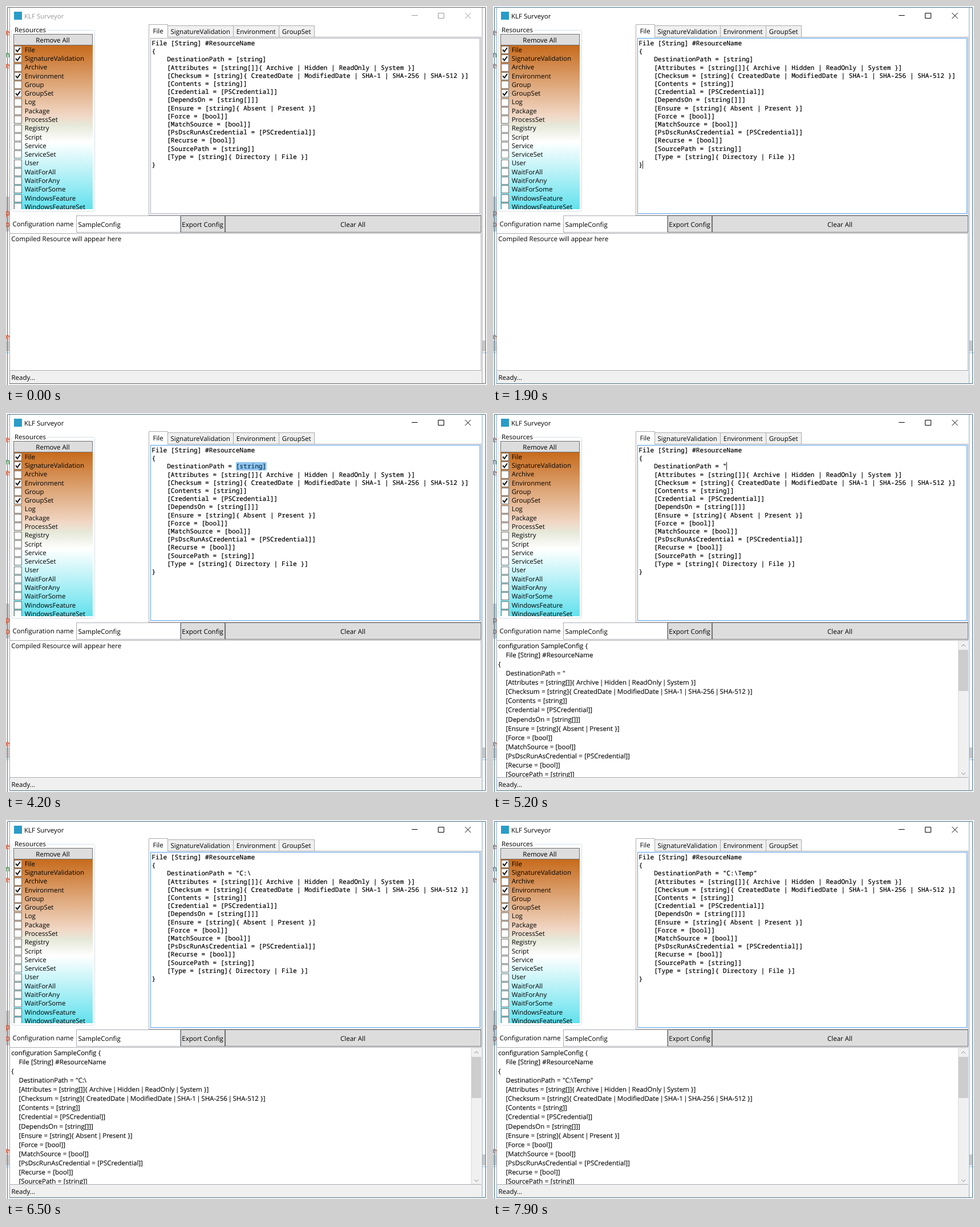
An HTML page that plays this animation: 843 px wide and 664 px high, repeating every 8000 ms.

```html
<!DOCTYPE html>
<html lang="en">
<head>
<meta charset="utf-8">
<title>KLF Surveyor</title>
<style>
html, body { margin: 0; width: 100%; height: 100%; overflow: hidden; background: #fff; }
svg { display: block; }
text { font: 11.5px "Open Sans", "Noto Sans", sans-serif; fill: #000; text-rendering: geometricPrecision; white-space: pre; }
.mid { text-anchor: middle; }
.code text { font: 11.16px "Noto Sans Mono", "DejaVu Sans Mono", monospace; stroke: #000; stroke-width: .2px; }
#out text { word-spacing: .35px; stroke: #000; stroke-width: .1px; }
.bar { letter-spacing: -1.7px; }
.behind text { font: 14px "Noto Sans Mono", monospace; fill: #d2421c; }
.btn { fill: #ddd; stroke: #707070; }
.box { fill: #fff; stroke: #abadb3; }
.tab { fill: #f0f0f0; stroke: #acacac; }
.glyph { fill: none; stroke: #000; }
.frame { fill: none; stroke: #4c7488; }
.edge { fill: none; stroke: #8fb0c4; }
.idle .glyph { stroke: #999; }
.idle .frame { stroke: #666; }
.idle .edge { stroke: #a8a8a8; }
.idle #title { fill: #999; }
.focus #editor { stroke: #569de5; }
</style>
</head>
<body>
<svg id="stage" class="idle" width="843" height="664" viewBox="0 0 843 664">
  <defs>
    <linearGradient id="sky" x2="0" y2="1">
      <stop offset="0" stop-color="#c76b1c"/>
      <stop offset=".43" stop-color="#f1d8c6"/>
      <stop offset=".49" stop-color="#e6e9da"/>
      <stop offset=".59" stop-color="#fff"/>
      <stop offset="1" stop-color="#62e1ed"/>
    </linearGradient>
    <clipPath id="listClip"><rect x="13" y="69" width="139" height="287"/></clipPath>
    <clipPath id="outClip"><rect x="7" y="399" width="809" height="239"/></clipPath>
  </defs>

  <g class="behind">
    <rect width="843" height="664" fill="#f7f7f7"/>
    <path fill="#c9c9c9" d="M0 334h7v61h-7zM0 586h7v19h-7zM834 586h7v19h-7z"/>
    <path stroke="#9cc3e0" d="M0 607.5h843"/>
    <text x="-1.5" y="51">e</text>
    <text x="-1.5" y="90" style="fill:#2c7a3a">n</text>
    <text x="-1.5" y="109">e</text>
    <text x="-1.5" y="367">p</text>
    <text x="-1.5" y="387">o</text>
    <text x="-1.5" y="584">e</text>
  </g>

  <rect x="7" y="3" width="827" height="658" fill="#fff"/>
  <path class="edge" d="M6.5 3V661M834.5 3V661"/>
  <path class="frame" d="M2.5 664V2.5H840.5V661.5H6"/>

  <rect x="14" y="10" width="14" height="14" fill="#2a9cc8"/>
  <text id="title" x="32" y="21.5">KLF Surveyor</text>
  <path class="glyph" d="M711 16.5h10.5M757.5 12.5h10v9h-10zM804.5 12l10 10M814.5 12l-10 10"/>

  <rect x="9.5" y="42.5" width="146" height="317" rx="3" fill="none" stroke="#d5dfe5"/>
  <rect x="14" y="38" width="58" height="8" fill="#fff"/>
  <text x="15" y="45.7">Resources</text>
  <rect x="13" y="69" width="139" height="287" fill="url(#sky)"/>
  <g id="list" clip-path="url(#listClip)"></g>
  <rect class="btn" x="13.5" y="49.5" width="138" height="19"/>
  <text class="mid" x="82" y="63.7">Remove All</text>

  <rect class="box" x="250.5" y="54.5" width="582" height="312"/>
  <g id="tabs"></g>
  <path d="M250.5 55V32.5H283.5V55" fill="#fff" stroke="#acacac"/>
  <text x="257.5" y="47.7">File</text>
  <rect id="editor" class="box" x="253.5" y="56.5" width="577" height="307"/>
  <g id="code" class="code"></g>
  <rect id="mark" x="403" y="86" width="53.6" height="14.6" fill="#0078d7" fill-opacity=".42"/>
  <rect id="caret" width="1" height="14.3" fill="#222"/>

  <text x="11.5" y="385.5">Configuration name</text>
  <rect class="box" x="123.5" y="367.5" width="182" height="29"/>
  <text x="126.5" y="387">SampleConfig</text>
  <rect class="btn" x="306.5" y="367.5" width="77" height="29"/>
  <text class="mid" x="344.5" y="387">Export Config</text>
  <rect class="btn" x="384.5" y="367.5" width="448" height="29"/>
  <text class="mid" x="608" y="387">Clear All</text>

  <rect class="box" x="6.5" y="398.5" width="826" height="240"/>
  <text id="hint" x="9.3" y="411.5">Compiled Resource will appear here</text>
  <g id="result">
    <g id="out" clip-path="url(#outClip)"></g>
    <path fill="#f0f0f0" d="M816 399h17v239h-17z"/>
    <path fill="#cdcdcd" d="M816 415h17v72h-17z"/>
    <path stroke="#858585" stroke-opacity=".3" d="M815.5 399v239"/>
    <path fill="none" stroke="#858585" d="M821 409l3.5-3.5 3.5 3.5M821 630l3.5 3.5 3.5-3.5"/>
  </g>

  <rect x="7" y="639" width="827" height="22" fill="#f0f0f0"/>
  <text x="9.5" y="655.3">Ready...</text>
</svg>
<script>
const $ = id => document.getElementById(id);
const add = (parent, tag, attrs, label = '') => {
  const el = document.createElementNS('http://www.w3.org/2000/svg', tag);
  for (const k in attrs) el.setAttribute(k, attrs[k]);
  el.textContent = label;
  return parent.appendChild(el);
};

const names = ('File SignatureValidation Archive Environment Group GroupSet Log Package ProcessSet Registry ' +
  'Script Service ServiceSet User WaitForAll WaitForAny WaitForSome WindowsFeature WindowsFeatureSet').split(' ');
const checked = [0, 1, 3, 5];
names.forEach((name, i) => {
  const y = 70 + i * 15.28;
  add($('list'), 'rect', { x: 14.5, y: Math.round(y) + .5, width: 13, height: 13, fill: '#fff', stroke: '#707070' });
  if (checked.includes(i))
    add($('list'), 'path', { d: `M17 ${y + 6.5}l3 3.5 5-7`, fill: 'none', stroke: '#111', 'stroke-width': 2 });
  add($('list'), 'text', { x: 32.7, y: y + 10.8 }, name);
});

[['SignatureValidation', 284, 115], ['Environment', 399, 80], ['GroupSet', 479, 62]].forEach(([name, x, w]) => {
  add($('tabs'), 'rect', { class: 'tab', x: x - .5, y: 34.5, width: w, height: 20 });
  add($('tabs'), 'text', { class: 'mid', x: x + w / 2 - .8, y: 48.7 }, name);
});

const path = 'DestinationPath = ';
const lines = ['File [String] #ResourceName', '{', path,
  '[Attributes = [string[]]{ Archive | Hidden | ReadOnly | System }]',
  '[Checksum = [string]{ CreatedDate | ModifiedDate | SHA-1 | SHA-256 | SHA-512 }]',
  '[Contents = [string]]', '[Credential = [PSCredential]]', '[DependsOn = [string[]]]',
  '[Ensure = [string]{ Absent | Present }]', '[Force = [bool]]', '[MatchSource = [bool]]',
  '[PsDscRunAsCredential = [PSCredential]]', '[Recurse = [bool]]', '[SourcePath = [string]]',
  '[Type = [string]{ Directory | File }]', '}'];
const LEFT = 255.4, CHAR = 6.696, PITCH = 14.2;
const code = lines.map((s, i) =>
  add($('code'), 'text', { x: LEFT + (i > 1 && i < 15 ? 4 * CHAR : 0), y: 69 + i * PITCH }, s));

// The interface font has a wide bar, so it is set tight on both sides
const out = ['configuration SampleConfig {', ...lines.slice(0, 14)].map((s, i) => {
  const line = add($('out'), 'text', { x: i === 0 || i === 2 ? 9.3 : 22.5, y: 411.5 + i * 16.14 });
  s.split(/(\|)/).forEach(part =>
    add(line, 'tspan', part === '|' ? { class: 'bar', dx: -1.7 } : {}, part));
  return line;
});

// Each step: start time, typed characters, caret as [line, column]
const typed = '"C:\\Temp"';
const steps = [
  [0, 0], [1900, 0, [15, 1]], [2400, 0], [2800, 0, [15, 1]],
  [3100, 0, [2, 30]], [3600, 0], [4100, 0, [2, 30]], [4200, 0],
  [5200, 1, [2, 23]], [5400, 2, [2, 24]], [5600, 3, [2, 25]], [5900, 4, [2, 26]], [6500, 4],
  [6600, 5, [2, 27]], [6700, 6, [2, 28]], [6800, 7, [2, 29]], [6900, 8, [2, 30]],
  [7400, 9, [2, 31]], [7900, 9]
];
const show = (id, on) => $(id).setAttribute('visibility', on ? 'visible' : 'hidden');

function draw(now) {
  const t = now % 8000;
  const [, count, caret] = steps.findLast(s => s[0] <= t);
  $('stage').setAttribute('class', (t < 1900 ? 'idle' : '') + (t < 1000 ? '' : ' focus'));
  show('mark', t >= 4200 && t < 5200);
  show('hint', !count);
  show('result', count);
  show('caret', caret);
  if (caret) {
    $('caret').setAttribute('x', Math.floor(LEFT + caret[1] * CHAR));
    $('caret').setAttribute('y', Math.round(57.8 + caret[0] * PITCH));
  }
  const value = count ? typed.slice(0, count) : '[string]';
  code[2].textContent = out[3].textContent = path + value;
  requestAnimationFrame(() => draw(performance.now() - start));
}
const start = performance.now();
draw(0);
</script>
</body>
</html>
```
